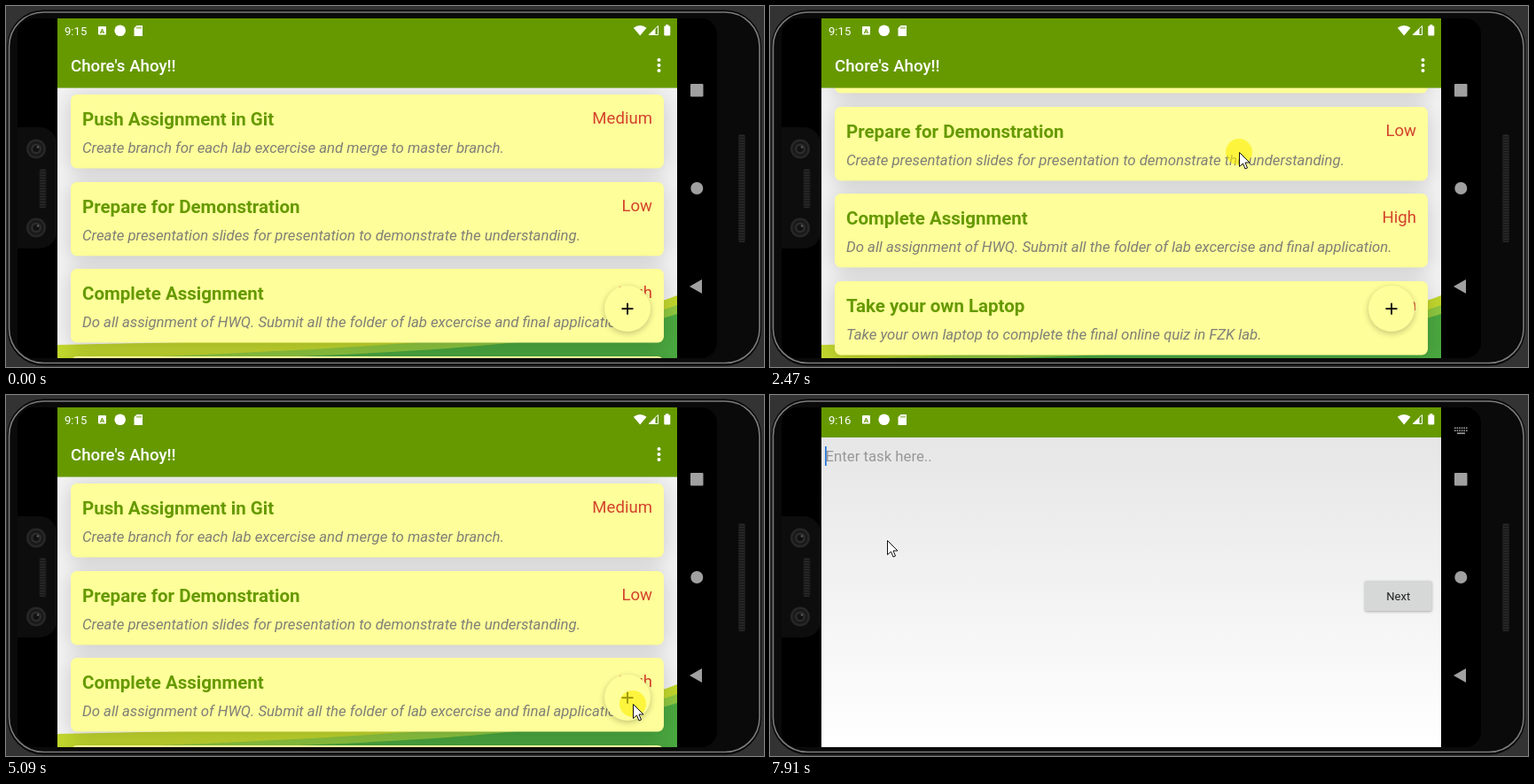
An HTML page with a canvas that plays this animation: 855x408 px, repeating every 7.99 s.

```html
<!DOCTYPE html>
<html lang="en">
<head>
<meta charset="utf-8">
<title>Task list</title>
<style>
html, body { margin: 0; width: 100%; height: 100%; overflow: hidden; background: #333334; }
canvas { display: block; width: 855px; height: 408px; }
</style>
</head>
<body>
<canvas id="stage"></canvas>
<script>
const LOOP = 7990;
const GREEN = '#669900', CARD = '#fefe9a', TEAL = '#1fd6c1', NAV = '#a0a0a0', WHITE = '#fff';
const APP = "Chore's Ahoy!!";
const tasks = [
  ['Push Assignment in Git', 'Medium', 'Create branch for each lab excercise and merge to master branch.'],
  ['Prepare for Demonstration', 'Low', 'Create presentation slides for presentation to demonstrate the understanding.'],
  ['Complete Assignment', 'High', 'Do all assignment of HWQ. Submit all the folder of lab excercise and final application.'],
  ['Take your own Laptop', 'High', 'Take your own laptop to complete the final online quiz in FZK lab.']
];

// Pointer glides: start, duration, destination
const glides = [
  [680, 320, 504, 330], [1620, 230, 518, 214], [1850, 350, 529, 165], [2540, 770, 552, 345],
  [3390, 390, 707, 349], [6040, 80, 503, 343], [6120, 540, 99, 177], [7680, 230, 132, 164]
];
const presses = [[1380, 3390], [5090, 5240], [6830, 7020]];

const canvas = document.getElementById('stage');
const ctx = canvas.getContext('2d');
const dpr = window.devicePixelRatio || 1;
canvas.width = 855 * dpr;
canvas.height = 408 * dpr;

const ramp = (t, start, length) => Math.max(0, Math.min(1, (t - start) / length));
const scrollAt = t => Math.round(84.6 * (ramp(t, 1680, 295) - ramp(t, 2500, 400)));

function pointerAt(t) {
  let x = 592, y = 392;
  for (const [start, length, toX, toY] of glides) {
    const k = ramp(t, start, length);
    x += (toX - x) * k;
    y += (toY - y) * k;
  }
  return [x, y];
}

function rect(x, y, w, h, color) {
  ctx.fillStyle = color;
  ctx.fillRect(x, y, w, h);
}

function paint(fill, stroke, width = 1) {
  if (fill) { ctx.fillStyle = fill; ctx.fill(); }
  if (stroke) { ctx.strokeStyle = stroke; ctx.lineWidth = width; ctx.stroke(); }
}

function round(x, y, w, h, r, fill, stroke, width) {
  ctx.beginPath();
  ctx.roundRect(x, y, w, h, r);
  paint(fill, stroke, width);
}

function disc(x, y, r, fill, stroke, width) {
  ctx.beginPath();
  ctx.arc(x, y, r, 0, Math.PI * 2);
  paint(fill, stroke, width);
}

function poly(points, fill, stroke) {
  ctx.beginPath();
  points.forEach(([x, y]) => ctx.lineTo(x, y));
  ctx.closePath();
  paint(fill, stroke);
}

function text(str, x, y, size, color, style = '', align = 'left') {
  ctx.font = `${style} ${size}px Roboto, sans-serif`;
  ctx.textAlign = align;
  ctx.fillStyle = color;
  ctx.fillText(str, x, y);
}

function shadowed(blur, dy, alpha, draw) {
  ctx.save();
  ctx.shadowColor = `rgba(0,0,0,${alpha})`;
  ctx.shadowBlur = blur * dpr;
  ctx.shadowOffsetY = dy * dpr;
  draw();
  ctx.restore();
}

function layer(alpha, draw) {
  if (alpha <= 0) return;
  ctx.save();
  ctx.globalAlpha = alpha;
  draw();
  ctx.restore();
}

function speaker(x, y, w, h) {
  round(x, y, w, h, 2, '#1b1b1b');
  for (let j = y + 1; j < y + h; j += 3) rect(x + 1, j, w - 2, 1, '#2b2b2b');
}

function camera(x, y) {
  ['#272727', '#191919', '#2c2c2c', '#121212'].forEach((c, i) => disc(x, y, 11 - i * 2.5, c));
  disc(x + 2, y - 2, 1.3, '#5a5a5a');
}

function phone() {
  rect(0, 0, 855, 408, '#333334');
  round(1.5, 4.5, 850.5, 402, 41, '#080808');
  round(3.5, 7, 846.5, 396.5, 39, '#0a0a0a', '#7c7c7e', 1.6);
  round(13, 14, 789, 384, 18, '#000');
  round(13, 137, 44, 137, [0, 19, 19, 0], '#0d0d0d');
  camera(34, 161.5);
  camera(34, 250.5);
  speaker(37.5, 184, 8, 44);
  speaker(826, 145, 8, 122);
  round(772, 88, 14.5, 14.5, 1, NAV);
  disc(779.3, 206, 7, NAV);
  poly([[771, 317], [785, 309], [785, 325]], NAV);
}

function keyboardIcon() {
  for (let i = 0; i < 12; i++) rect(772 + (i % 6) * 2.6, i < 6 ? 36.5 : 39.5, 1.6, 1.6, NAV);
  rect(775, 42.5, 9, 1.6, NAV);
}

function statusBar(clock) {
  rect(58, 14, 699, 34, GREEN);
  text(clock, 66, 32.5, 13.1, WHITE);
  round(104, 23, 9, 9.5, 1, WHITE);
  text('A', 108.5, 30.8, 8, GREEN, 'bold', 'center');
  disc(128.7, 27.8, 6.3, WHITE);
  poly([[147.5, 22], [154, 22], [154, 34], [144.5, 34], [144.5, 25]], WHITE);
  for (let x = 147.5; x < 152; x += 2) rect(x, 23.5, 1, 2.2, GREEN);
  ctx.beginPath();
  ctx.moveTo(715.2, 33.5);
  ctx.arc(715.2, 33.5, 11.5, -Math.PI * 0.72, -Math.PI * 0.28);
  paint(WHITE);
  poly([[725, 32.5], [735.5, 32.5], [735.5, 22.5]], null, WHITE);
  poly([[725, 33], [732.5, 33], [732.5, 25.5]], WHITE);
  round(742.3, 22.5, 7, 11, 1, WHITE);
  rect(744.3, 21, 3, 2, WHITE);
}

function toolbar() {
  rect(58, 47, 699, 45.6, GREEN);
  text(APP, 73, 74, 18.7, WHITE, '500');
}

function band(x, y, bendX, bendY, endY, color) {
  ctx.beginPath();
  ctx.moveTo(x, y);
  ctx.quadraticCurveTo(bendX, bendY, 757, endY);
  ctx.lineTo(757, 398);
  ctx.lineTo(x, 398);
  paint(color);
}

function backdrop(color) {
  rect(58, 92, 699, 306, color);
  band(58, 383, 650, 373, 327, '#c3d82e');
  band(120, 398, 650, 379, 338, '#8fc840');
  band(270, 398, 640, 387, 348, '#4ba940');
}

function card([title, priority, note], y) {
  shadowed(24, 3, 0.18, () => round(73, y, 669, 83.6, 7, CARD));
  text(title, 86, y + 35, 20.5, GREEN, 'bold');
  text(priority, 729, y + 33, 18.6, '#d3432c', '', 'right');
  text(note, 86, y + 66, 16.76, '#7f7f78', 'italic');
}

function listPage(scroll) {
  backdrop('#f3f3f3');
  tasks.forEach((task, i) => card(task, Math.round(100 + i * 98.6) - scroll));
  shadowed(7, 2, 0.24, () => disc(701, 342, 26, CARD));
  rect(694.5, 341.2, 13, 1.9, '#111');
  rect(700.1, 335.7, 1.9, 13, '#111');
  toolbar();
  for (let y = 61; y < 74; y += 6) disc(736.5, y, 2, WHITE);
}

function field(label, hint, y) {
  text(label, 70, y, 18.5, GREEN, 'bold');
  text(hint, 74, y + 32.7, 16.75, '#b9b9b9');
  rect(73, y + 39, 273, 1, '#8a8a8a');
}

function formPage(focus, bar) {
  backdrop('#fefefe');
  field('Task to be done', 'Enter task here..', 142);
  field('Task Description', 'Enter Task Description Here..', 228);
  layer(focus, () => {
    rect(73, 180.5, 273, 2, TEAL);
    rect(73, 160, 1.8, 19, TEAL);
  });
  text('Enter priority', 70, 323, 18.5, GREEN, 'bold');
  disc(84.5, 369, 8.4, null, TEAL, 1.9);
  disc(84.5, 369, 4.9, TEAL);
  text('High', 99, 374, 13, '#222');
  layer(bar, () => rect(753, 93, 4, 186, '#b8b8b8'));
  toolbar();
  round(726, 58.5, 17, 17, [2, 5, 2, 2], WHITE);
  rect(728, 60.5, 10, 3.7, GREEN);
  disc(734.5, 70.2, 2.8, GREEN);
}

function entryPage() {
  const shade = ctx.createLinearGradient(0, 48, 0, 398);
  shade.addColorStop(0, '#e6e6e6');
  shade.addColorStop(1, WHITE);
  rect(58, 48, 699, 350, shade);
  text('Enter task here..', 62.5, 75.3, 16.75, '#979797');
  rect(62, 58, 1.8, 22, '#2f78d6');
  shadowed(3, 1, 0.3, () => round(671, 210, 75.5, 34, 2, '#d6d7d7'));
  text('Next', 708.7, 232, 13, '#222', '', 'center');
}

function pointer(t) {
  if (t < 680) return;
  const [x, y] = pointerAt(t);
  if (presses.some(([down, up]) => t >= down && t < up)) disc(x, y, 15, 'rgba(252,238,0,0.6)');
  const arrow = [[0, 0], [0, 16], [4, 12.5], [6.5, 18.5], [9, 17.5], [6.5, 11.5], [11.5, 11.5]];
  poly(arrow.map(([dx, dy]) => [x + dx + 0.5, y + dy + 0.5]), WHITE, '#111');
}

function draw(t) {
  ctx.setTransform(dpr, 0, 0, dpr, 0, 0);
  phone();
  ctx.save();
  ctx.beginPath();
  ctx.rect(58, 14, 699, 384);
  ctx.clip();
  const form = ramp(t, 5200, 240);
  if (form < 1) listPage(scrollAt(t));
  layer(form, () => formPage(ramp(t, 7400, 150), 1 - ramp(t, 6900, 300)));
  layer(ramp(t, 7700, 200), entryPage);
  statusBar(t < 7040 ? '9:15' : '9:16');
  ctx.restore();
  if (t >= 7760) keyboardIcon();
  pointer(t);
}

const begin = performance.now();
function frame() {
  draw((performance.now() - begin) % LOOP);
  requestAnimationFrame(frame);
}
frame();
</script>
</body>
</html>
```
